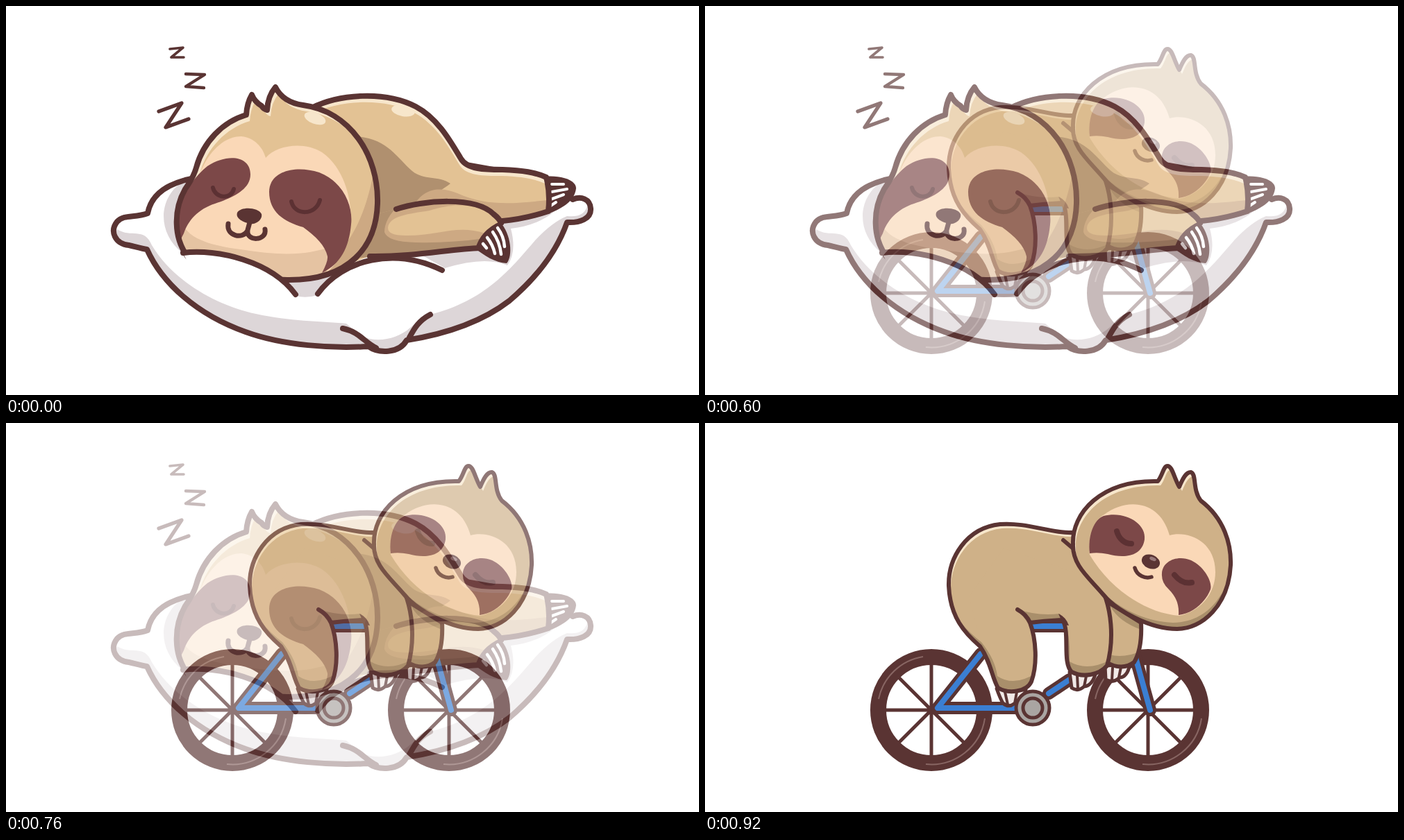
These frames come from a looping animation (998 by 561 pixels, 1320 ms). An HTML page:

```html
<!DOCTYPE html>
<html lang="en">
<head>
<meta charset="utf-8">
<title>Sleepy sloth</title>
<style>
html, body { margin: 0; width: 100%; height: 100%; overflow: hidden; background: #fff; }
svg { display: block; width: 100vw; height: 100vh; }
.ln { fill: none; stroke: #5a3433; stroke-width: 8; stroke-linecap: round; stroke-linejoin: round; }
.thin { stroke-width: 6; }
.dark { fill: #5a3433; }
.white { fill: #fff; }
.grey { fill: #ddd6d8; }
.tan { fill: #e3c294; }
.mid { fill: #cda983; }
.deep { fill: #b0906f; }
.cream { fill: #f7e6cb; }
.face { fill: #fad8b7; }
.cheek { fill: #e5c3a2; }
.patch { fill: #7c4848; }
.fur { fill: #cfb188; }
.under { fill: #a98f6b; }
.lid { fill: none; stroke: #5c3133; stroke-width: 6; stroke-linecap: round; }
.slit { fill: none; stroke: #fff; stroke-width: 4.5; stroke-linecap: round; }
.tube { fill: none; stroke: #5a3433; stroke-width: 18; stroke-linejoin: round; stroke-linecap: round; }
.blue { fill: none; stroke: #3b7fd3; stroke-width: 8; stroke-linejoin: round; stroke-linecap: round; }
.claw { fill: #f1e9e7; stroke: #5a3433; stroke-width: 5; stroke-linejoin: round; }
</style>
</head>
<body>
<svg viewBox="0 0 998 561" preserveAspectRatio="none">
<defs>
  <path id="pillow" d="M258 251C232 258 209 272 204 299C185 306 170 300 160 311C149 325 157 343 177 345C186 347 195 350 203 351C225 400 275 445 345 470C400 490 470 494 522 491C536 501 566 502 577 482C640 472 690 452 725 425C766 390 794 352 808 312C826 313 843 307 842 292C841 278 828 274 816 279L780 250L500 200Z"/>
  <path id="torso" d="M440 147C480 127 545 122 590 145C622 162 640 195 655 220C664 236 690 236 715 236C745 237 762 240 778 247Q784 270 781 296C760 303 735 308 715 310L600 330L500 370L470 250Z"/>
  <path id="arm" d="M562 293C600 280 676 274 702 300Q716 311 709 322Q690 328 683 349C650 350 610 362 560 359L500 364L534 300Z"/>
  <path id="head" d="M262 362C241 335 241 294 258 264Q270 247 274 233C284 196 312 167 346 157Q347 140 354 128Q358 138 368 144Q371 149 376 150Q377 130 388 117Q399 139 428 143C495 152 537 215 535 285C533 346 496 396 405 395C350 393 290 385 262 362Z"/>
  <path id="trunk" d="M532 158C500 160 465 143 425 146C376 151 350 195 351 235C353 280 374 303 396 322C412 345 413 367 422 382C437 391 463 388 470 373C479 348 477 312 468 288Q490 285 515 284C526 302 514 345 528 359C545 368 568 363 579 350C588 318 590 265 562 220Z"/>
  <path id="backArm" d="M575 255L628 288C629 310 627 330 618 345C605 355 590 352 578 345Z"/>
  <path id="dozer" d="M530 175C528 130 570 82 652 84C659 76 660 62 666 62C673 62 675 78 683 92C688 80 693 70 700 71C708 74 702 97 714 112C748 138 758 175 757 205C754 263 716 297 680 297C640 297 592 270 574 248C552 222 529 205 530 175Z"/>
  <clipPath id="inPillow"><use href="#pillow"/></clipPath>
  <clipPath id="inTorso"><use href="#torso"/></clipPath>
  <clipPath id="inArm"><use href="#arm"/></clipPath>
  <clipPath id="inHead"><use href="#head"/></clipPath>
  <clipPath id="inTrunk"><use href="#trunk"/></clipPath>
  <clipPath id="inBackArm"><use href="#backArm"/></clipPath>
  <clipPath id="inDozer"><use href="#dozer"/></clipPath>
  <g id="wheel">
    <path class="ln" style="stroke-width:5" d="M-66 0H66M0-66V66M-47-47L47 47M-47 47L47-47"/>
    <circle r="76.5" fill="none" stroke="#5a3433" stroke-width="23"/>
    <path d="M-76 -16A78 78 0 0 1 -12 -77M77 12A78 78 0 0 1 -8 78" fill="none" stroke="#886663" stroke-width="2"/>
  </g>
</defs>

<g id="nap">
  <use href="#pillow" class="white"/>
  <g clip-path="url(#inPillow)">
    <path class="grey" d="M160 322C180 335 199 318 210 345C240 395 300 431 360 444C410 455 450 454 490 458Q508 472 525 491L480 510L330 490L190 370L150 345Z"/>
    <path class="grey" d="M514 477C536 486 564 480 582 464Q594 453 611 445C690 425 726 380 762 338Q786 312 808 303Q835 306 838 284L860 310L790 400L680 510H530Z"/>
    <path class="grey" d="M262 249C219 270 215 326 254 356L290 330ZM395 390L417 418Q432 422 449 417L476 385Z"/>
    <path class="grey" d="M600 360L700 305L790 296Q765 317 727 321Q736 355 722 374Q690 360 632 378Z"/>
  </g>
  <use href="#pillow" class="ln"/>

  <path class="dark" d="M776 246C797 244 821 250 821 263C819 280 804 291 780 300Z"/>
  <path class="slit" style="stroke-width:4" d="M786 257L803 257M786 268L808 264M784 279L803 272M783 289L792 283"/>
  <use href="#torso" class="cream"/>
  <g clip-path="url(#inTorso)">
    <use href="#torso" class="tan" transform="translate(-2 9)"/>
    <path class="deep" d="M505 188C550 192 562 218 585 238C602 252 622 244 640 256C630 264 610 275 600 290L525 375L480 300Z"/>
    <path class="mid" d="M585 292C600 262 625 260 650 270C695 291 740 284 790 279V315H690L600 320Z"/>
    <ellipse class="cream" cx="572" cy="151" rx="17" ry="8" transform="rotate(10 572 151)"/>
  </g>
  <path class="ln" d="M440 147C480 127 545 122 590 145C622 162 640 195 655 220C664 236 690 236 715 236C745 237 762 240 778 247Q784 270 781 296C760 303 735 308 715 310"/>
  <use href="#arm" class="mid"/>
  <g clip-path="url(#inArm)">
    <path class="deep" d="M490 370L525 285H568Q545 306 545 326Q549 340 590 341Q640 342 690 335V370Z"/>
    <path class="tan" d="M550 320C552 302 580 300 610 295C650 282 685 285 716 310L690 328C650 314 620 332 575 331Q550 331 550 320Z"/>
  </g>
  <path class="ln" d="M562 293C600 280 676 274 702 300Q711 307 713 313M524 361C590 362 640 350 683 349"/>
  <path class="dark" d="M711 311C728 329 730 361 721 371C704 370 689 360 676 350Q683 324 711 311Z"/>
  <path class="slit" d="M708 320Q717 332 718 347M701 326Q711 340 713 358M693 334Q701 344 704 357M687 343L692 349"/>

  <use href="#head" class="cream"/>
  <g clip-path="url(#inHead)">
    <use href="#head" class="tan" transform="translate(5 9)"/>
    <path class="mid" d="M532 225C518 310 493 355 430 402H540Z"/>
    <path class="face" d="M249 350C248 300 272 255 283 233C296 206 316 188 339 188C358 190 370 204 374 219C390 200 430 195 455 211C491 236 501 291 495 326C490 357 470 380 445 400H300Z"/>
    <path class="cheek" d="M245 330L256 318C270 340 305 347 345 352C395 360 435 360 470 346L458 402H250Z"/>
    <path class="patch" d="M245 332C240 296 263 252 290 231C319 212 352 216 352 243C352 264 328 276 301 285C276 293 262 310 256 328Q251 338 247 345Z"/>
    <path class="patch" d="M379 268C379 238 417 229 451 240C487 254 500 290 497 315C494 348 482 372 455 385Q464 368 463 361C460 346 446 332 428 319C400 311 379 297 379 268Z"/>
    <ellipse class="cream" cx="445" cy="162" rx="16" ry="8" transform="rotate(20 445 162)"/>
  </g>
  <path class="lid" d="M298 262C301 277 324 280 328 264M411 282C415 302 446 303 452 280"/>
  <path class="dark" d="M333 298C338 289 363 290 368 300C370 309 358 316 351 314C343 312 330 307 333 298Z"/>
  <path class="ln" style="stroke-width:7" d="M351 312L348 323M320 314C317 332 341 337 348 324C346 340 376 339 373 322"/>
  <use href="#head" class="ln"/>
  <path class="white" d="M255 357C305 351 382 368 417 416L395 430L310 410L262 370Z"/>
  <path class="white" d="M449 415C485 365 560 347 628 381L600 405L470 430Z"/>
  <path class="ln" d="M255 356C305 350 382 368 417 416M449 415C485 365 560 347 628 381M485 465C509 470 516 485 533 493M611 445C594 454 588 465 581 478"/>
  <path class="ln" style="stroke-width:3.6" d="M236 62L255 60L238 74L256 74"/>
  <path class="ln" style="stroke-width:4.4" d="M259 98L286 99L259 116L285 118"/>
  <path class="ln" style="stroke-width:5.2" d="M220 152L253 140L230 175L263 163"/>
</g>

<g id="ride" opacity="0">
  <rect class="white" width="998" height="561"/>
  <use href="#wheel" x="326" y="414"/>
  <use href="#wheel" x="638" y="414"/>
  <path class="tube" d="M397 333L335 411H448M465 293H527M495 390L525 370M620 338L641 414"/>
  <path class="blue" d="M397 333L335 411H448M465 293H527M495 390L525 370M620 338L641 414"/>

  <path class="claw" d="M576 350L577 370Q588 376 597 367Q608 367 612 348Z"/>
  <path class="ln" style="stroke-width:4" d="M587 353L586 371M599 352L596 367"/>
  <use href="#backArm" class="fur"/>
  <path class="under" clip-path="url(#inBackArm)" d="M570 250L640 290V302Q598 290 584 265L582 334Q604 340 630 328V360H570Z"/>
  <use href="#backArm" class="ln thin"/>

  <path class="claw" d="M420 383Q425 397 429 404Q437 411 445 405Q456 404 462 385Z"/>
  <path class="ln" style="stroke-width:4" d="M432 388L436 406M449 388L446 404"/>
  <path class="claw" d="M525 359L528 382Q537 388 546 380Q557 379 562 363Z"/>
  <path class="ln" style="stroke-width:4" d="M536 364L537 383M549 365L546 380"/>
  <use href="#trunk" class="cream"/>
  <g clip-path="url(#inTrunk)">
    <use href="#trunk" class="fur" transform="translate(3 6)"/>
    <path class="fur" d="M380 250L430 180L560 225L590 270L570 365H410Z"/>
    <path class="under" d="M349 250Q359 286 398 316Q418 341 421 365Q445 381 476 361V395H410L380 320ZM450 268Q478 279 511 275Q527 293 525 344Q550 359 583 342V372H520L505 290H466Z"/>
  </g>
  <path class="ln thin" d="M532 158C500 160 465 143 425 146C376 151 350 195 351 235C353 280 374 303 396 322C412 345 413 367 422 382C437 391 463 388 470 373C479 348 477 312 468 288Q463 276 450 269M468 288Q490 285 515 284C526 302 514 345 528 359C545 368 568 363 579 350C588 318 590 265 562 220Q543 190 516 169"/>
  <path class="dark" d="M509 275Q520 280 524 292L516 291Z"/>
  <circle cx="472" cy="411" r="24" fill="#aaa5a2" stroke="#5a3433" stroke-width="5"/>
  <circle cx="472" cy="411" r="14" fill="#aaa5a2" stroke="#5a3433" stroke-width="5"/>

  <use href="#dozer" class="cream"/>
  <g clip-path="url(#inDozer)">
    <use href="#dozer" class="fur" transform="translate(4 6)"/>
    <path class="under" d="M526 188C552 228 597 284 674 288C724 287 748 250 762 204V305H600L520 220Z"/>
    <path class="face" d="M554 190C551 164 560 140 575 132C606 108 655 110 669 162C695 155 735 170 735 215C735 246 714 271 683 278C634 274 583 239 554 190Z"/>
    <path class="patch" d="M554 188C551 163 560 139 574 134C605 126 636 145 633 168C629 194 602 195 580 189Q566 186 554 188Z"/>
    <path class="patch" d="M658 217C659 199 680 190 700 198C719 207 731 229 728 240C720 260 701 275 682 277C683 261 678 250 668 240Q657 230 658 217Z"/>
  </g>
  <path class="lid" style="stroke-width:8" d="M593 156C596 167 604 174 614 174M676 219C684 229 692 232 701 230"/>
  <ellipse class="dark" cx="642" cy="200" rx="13.5" ry="10" transform="rotate(22 642 200)"/>
  <ellipse cx="645" cy="196" rx="5" ry="2.5" fill="#98797a" transform="rotate(22 645 196)"/>
  <path class="ln" style="stroke-width:5.5" d="M619 209C622 220 634 225 643 222"/>
  <use href="#dozer" class="ln thin"/>
</g>
</svg>
<script>
const LOOP = 1320, START = 480, STEP = 40, COUNT = 12;
const ride = document.getElementById("ride");

function mix(t) {
  const n = Math.floor((t - START) / STEP) + 1;
  return Math.max(0, Math.min(COUNT, n)) / COUNT;
}

const begin = performance.now();
function draw(now) {
  ride.setAttribute("opacity", mix(Math.max(0, now - begin) % LOOP));
  requestAnimationFrame(draw);
}
requestAnimationFrame(draw);
</script>
</body>
</html>
```
